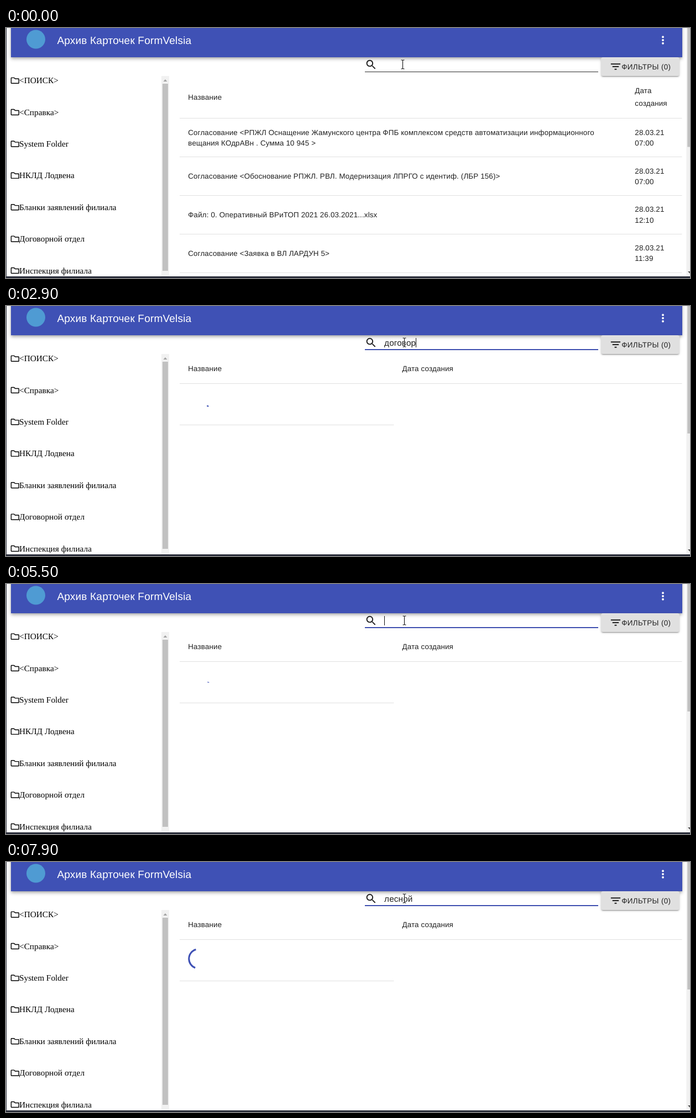
Write an HTML page that moves like this. It is 1237 px wide and 453 px high and loops after 8000 ms.

```html
<!DOCTYPE html>
<html lang="ru">
<head>
<meta charset="utf-8">
<title>Архив карточек</title>
<style>
  html, body { margin: 0; width: 100%; height: 100%; overflow: hidden; background: #fff; }
  svg { position: absolute; left: 0; top: 0; width: 1237px; height: 453px; }
  text { white-space: pre; text-rendering: geometricPrecision; fill: #212121;
         font-family: "Liberation Sans", Arial, sans-serif; }
  .cell { font-size: 13.39px; letter-spacing: .1435px; }
  .side { font-size: 15.3px; font-family: "Liberation Serif", "Times New Roman", serif; fill: #000; }
  .title { font-size: 19.13px; letter-spacing: .143px; fill: #fff; }
  .button { font-size: 13.39px; letter-spacing: .383px; }
  .field { font-size: 15.304px; letter-spacing: .1435px; }
  .bar, .raised { position: absolute; }
  .bar { left: 8.65px; top: -12px; width: 1214px; height: 64.5px; background: #3f51b5;
         box-shadow: 0 2px 4px -1px rgba(0,0,0,.2), 0 4px 5px rgba(0,0,0,.14), 0 1px 10px rgba(0,0,0,.12); }
  .raised { left: 1076px; top: 52.7px; width: 142px; height: 34.4px; border-radius: 3.8px; background: #e0e0e0;
            box-shadow: 0 3px 1px -2px rgba(0,0,0,.2), 0 2px 2px rgba(0,0,0,.14), 0 1px 5px rgba(0,0,0,.12); }
</style>
</head>
<body>
<div class="bar"></div>
<div class="raised"></div>
<svg viewBox="0 0 1237 453">
  <circle cx="54" cy="20.5" r="17" fill="#4f9bd3"/>
  <text class="title" x="92.4" y="28.6">Архив Карточек FormVelsia</text>
  <g fill="#fff">
    <circle cx="1188" cy="16.3" r="1.95"/>
    <circle cx="1188" cy="22" r="1.95"/>
    <circle cx="1188" cy="27.7" r="1.95"/>
  </g>

  <g id="sidebar"></g>
  <rect x="281" y="87" width="14" height="363" fill="#f1f1f1"/>
  <path d="M284.5 97l3.5-4 3.5 4z" fill="#a3a3a3"/>
  <rect x="283" y="101" width="10" height="339" fill="#c1c1c1"/>

  <g id="lists"></g>
  <g id="loading">
    <text class="cell" x="329.3" y="118.4">Название</text>
    <text class="cell" x="716.5" y="118.4">Дата создания</text>
    <rect x="314" y="140" width="908.5" height="1" fill="#e0e0e0"/>
    <rect x="314" y="215" width="387.5" height="1" fill="#e0e0e0"/>
    <circle id="spinner" r="20.2" fill="none" stroke="#3f51b5" stroke-width="3.6"/>
  </g>

  <path transform="translate(648.8 55) scale(.9565)" fill="#212121" d="M15.5 14h-.79l-.28-.27C15.41 12.59 16 11.11 16 9.5 16 5.91 13.09 3 9.5 3S3 5.91 3 9.5 5.91 16 9.5 16c1.61 0 3.09-.59 4.23-1.57l.27.28v.79l5 4.99L20.49 19l-4.99-5zm-6 0C7.01 14 5 11.99 5 9.5S7.01 5 9.5 5 14 7.01 14 9.5 11.99 14 9.5 14z"/>
  <rect x="649" y="79" width="422" height="1" fill="#2b2b2b"/>
  <rect id="underline" y="78" height="1.91" fill="#3f51b5"/>
  <rect id="selection" x="684" y="58" width="57.5" height="17" fill="#1e90ff"/>
  <text id="typed" class="field" x="684.1" y="71.8"></text>
  <rect id="caret" y="58" width="1" height="17" fill="#111"/>
  <g id="pointer" fill="none">
    <path d="M-3 58H-1L0 59 1 58H3M0 59V73M-3 74H-1L0 73 1 74H3" stroke="#fff" stroke-opacity=".7" stroke-width="2.4"/>
    <path d="M-3 58H-1L0 59 1 58H3M0 59V73M-3 74H-1L0 73 1 74H3" stroke="#111" stroke-width="1.1"/>
  </g>

  <path transform="translate(1091 58.5) scale(.9565)" fill="#212121" d="M10 18h4v-2h-4v2zM3 6v2h18V6H3zm3 7h12v-2H6v2z"/>
  <text class="button" x="1113.2" y="74.6">ФИЛЬТРЫ (0)</text>

  <rect x="1230.4" width="7" height="450" fill="#f1f1f1"/>
  <rect id="thumb" x="1232.3" width="5" fill="#c1c1c1"/>
  <path d="M1233 441h8l-4 4z" fill="#505050"/>
  <rect width="1" height="453" fill="#2b2e3b"/>
  <rect y="450" width="1237" height="3" fill="#2b2e3b"/>
</svg>
<script>
const LOOP = 8000, STEP = 100;
const $ = id => document.getElementById(id);

function add(parent, tag, attrs, content = '') {
  const node = document.createElementNS('http://www.w3.org/2000/svg', tag);
  for (const key in attrs) node.setAttribute(key, attrs[key]);
  node.textContent = content;
  return parent.appendChild(node);
}
const show = (id, on) => $(id).setAttribute('visibility', on ? 'visible' : 'hidden');

const folderIcon = 'M464 128H272l-54.6-54.6c-6-6-14.1-9.4-22.6-9.4H48C21.5 64 0 85.5 0 112v288' +
  'c0 26.5 21.5 48 48 48h416c26.5 0 48-21.5 48-48V176c0-26.5-21.5-48-48-48z' +
  'm0 272H48V112h140.1l54.6 54.6c6 6 14.1 9.4 22.6 9.4H464v224z';
const folders = ['<ПОИСК>', '<Справка>', 'System Folder', 'НКЛД Лодвена',
  'Бланки заявлений филиала', 'Договорной отдел', 'Инспекция филиала'];
folders.forEach((name, i) => {
  const y = 95 + i * 57.4;
  add($('sidebar'), 'path', { d: folderIcon, transform: `translate(8.65 ${y - 7.5}) scale(.0299)` });
  add($('sidebar'), 'text', { class: 'side', x: 24, y: y + 5.1 }, name);
});

// Lines of a cell, centred vertically around y
function cell(parent, x, y, lines, pitch) {
  lines.forEach((line, i) => add(parent, 'text', {
    class: 'cell', x, y: y + 4.6 + (i - (lines.length - 1) / 2) * pitch
  }, line));
}

function buildList(id, dateX, day, rows) {
  const list = add($('lists'), 'g', { id });
  const rule = y => add(list, 'rect', { x: 314, y, width: 908.5, height: 1, fill: '#e0e0e0' });
  cell(list, 329.3, 125, ['Название'], 0);
  cell(list, dateX, 125, ['Дата', 'создания'], 22.96);
  rule(163);
  rows.forEach(([time, ...lines], i) => {
    const y = 198.7 + i * 69.86;
    cell(list, 329.3, y, lines, 19.15);
    cell(list, dateX, y, [day, time], 19.15);
    rule(Math.round(163.3 + (i + 1) * 69.86));
  });
}

buildList('recent', 1137.3, '28.03.21', [
  ['07:00', 'Согласование <РПЖЛ Оснащение Жамунского центра ФПБ комплексом средств автоматизации информационного',
    'вещания КОдрАВн . Сумма 10 945 >'],
  ['07:00', 'Согласование <Обоснование РПЖЛ. РВЛ. Модернизация ЛПРГО с идентиф. (ЛБР 156)>'],
  ['12:10', 'Файл: 0. Оперативный ВРиТОП 2021 26.03.2021...xlsx'],
  ['11:39', 'Согласование <Заявка в ВЛ ЛАРДУН 5>']
]);
buildList('found', 1135.3, '26.03.21', [
  ['10:46', 'Согласование <АО Концерн ТЛО Варуд-Лесин Договор на приобретение стол оператора для Жамунского центра ФПБ>'],
  ['09:40', 'Согласование <Нолт-Кавид ООО акт 40 от 24.03.2021 на сумму 1700>'],
  ['09:39', 'Согласование <Лув Тан ООО акт 5 от 19.03.2021на сумму 97600>'],
  ['09:38', 'Согласование <Лустаретия ООО акт 14 от 24.03.2021 на сумму 45000>']
]);

const typing = [[0, ''], [1200, 'д'], [1500, 'до'], [1800, 'дого'], [2000, 'догов'], [2300, 'договор'],
  [5000, ''], [6200, 'ле'], [6600, 'лес'], [6900, 'лесно'], [7200, 'лесной']];
const views = [[0, 'recent'], [2900, 'loading'], [3800, 'found'], [5500, 'loading'], [6000, 'recent'], [7600, 'loading']];
const caretOn = [[0, false], [400, true], [900, false], [1200, true], [3200, false], [3700, true],
  [4200, false], [5000, true], [5600, false], [6000, true], [7700, false]];
const spinStarts = [[0, 0], [2900, 2838], [5500, 5472], [7600, 7552]];

const valueAt = (keys, t) => keys.filter(key => key[0] <= t).pop()[1];
const clamp = v => Math.min(1, Math.max(0, v));

// CSS cubic-bezier timing, solved by bisection
function bezier(x1, y1, x2, y2) {
  const curve = (a, b, s) => 3 * a * s * (1 - s) ** 2 + 3 * b * s * s * (1 - s) + s ** 3;
  return x => {
    if (x <= 0 || x >= 1) return clamp(x);
    let lo = 0, hi = 1;
    for (let i = 0; i < 24; i++) {
      const mid = (lo + hi) / 2;
      if (curve(x1, x2, mid) < x) lo = mid; else hi = mid;
    }
    return curve(y1, y2, lo);
  };
}
const easeInOut = bezier(.42, 0, .58, 1);
const easeOut = bezier(0, 0, .2, 1);

function drawSpinner(age) {
  const p = age / 1400 % 1;
  const grow = easeInOut(clamp(p * 2)), drain = easeInOut(clamp(p * 2 - 1));
  const spinner = $('spinner');
  spinner.setAttribute('transform', `translate(348.4 175.3) scale(.8695) rotate(${p * 360})`);
  spinner.setAttribute('stroke-dasharray', `${1 + 99 * grow} 200`);
  spinner.setAttribute('stroke-dashoffset', -15 * grow - 110 * drain);
}

function draw(t) {
  const view = valueAt(views, t);
  for (const id of ['recent', 'found', 'loading']) show(id, id === view);
  $('thumb').setAttribute('height', view === 'loading' ? 231 : 215.5);
  if (view === 'loading') drawSpinner(t - valueAt(spinStarts, t));

  const half = 211 * easeOut(clamp((t - 250) / 200));
  $('underline').setAttribute('x', 860 - half);
  $('underline').setAttribute('width', half * 2);

  const typed = $('typed'), selected = t >= 4600 && t < 5000;
  typed.textContent = valueAt(typing, t);
  typed.style.fill = selected ? '#fff' : '';
  show('selection', selected);

  const end = typed.textContent ? typed.getComputedTextLength() : 0;
  $('caret').setAttribute('x', Math.round(684.1 + end));
  show('caret', valueAt(caretOn, t));
  $('pointer').setAttribute('transform', `translate(${t < 700 ? 717.5 : 720.5} 0)`);
}

const start = performance.now();
function tick() {
  const t = (performance.now() - start) % LOOP;
  draw(Math.floor(t / STEP) * STEP);
  requestAnimationFrame(tick);
}
tick();
</script>
</body>
</html>
```
